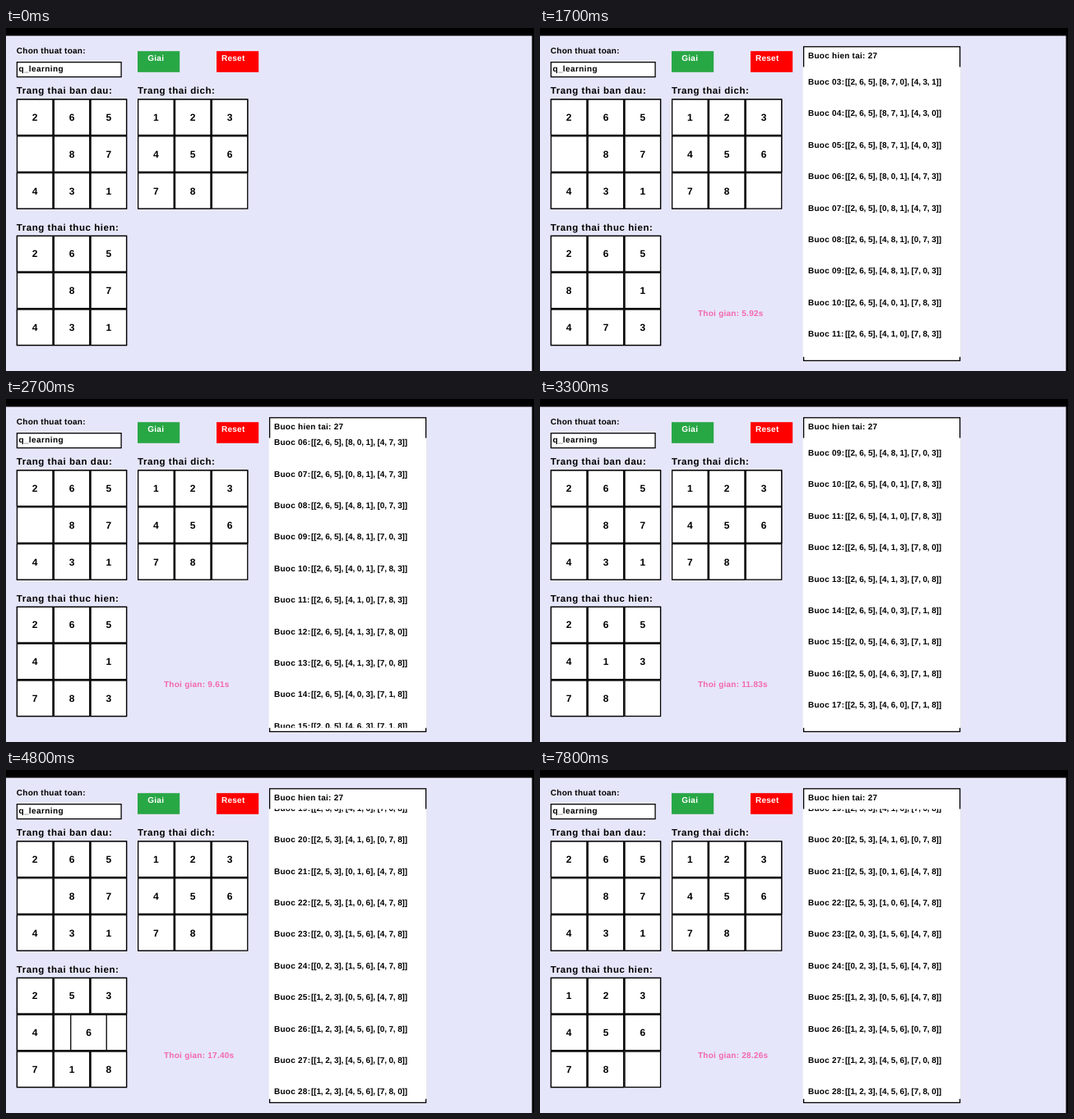
These frames come from a looping animation (642 px wide and 418 px high, 7900 ms). An HTML page:

```html
<!DOCTYPE html>
<html lang="vi">
<head>
<meta charset="utf-8">
<title>8-puzzle</title>
<style>
  html, body { margin: 0; width: 100%; height: 100%; overflow: hidden; background: #000; }
  svg { display: block; width: 642px; height: 418px; }
  text {
    font: bold 10px "Liberation Sans", Arial, sans-serif;
    letter-spacing: .25px;
    text-rendering: geometricPrecision;
    white-space: pre;
  }
  .title { font-size: 11.5px; letter-spacing: .55px; }
  .num { font-size: 12px; letter-spacing: 0; text-anchor: middle; }
  .label { letter-spacing: .4px; }
  .state { letter-spacing: -.125px; }
  .light { fill: #fff; }
  .time { fill: #f268b0; }
  .box { fill: #fff; stroke: #000; stroke-width: 1.3px; }
</style>
</head>
<body>
<svg id="stage" viewBox="0 0 642 418">
  <defs>
    <clipPath id="view"><rect x="319" y="47.5" width="193" height="353.3"/></clipPath>
  </defs>
  <rect y="9.5" width="639.5" height="409" fill="#e6e6fa"/>
  <text x="12.8" y="30.5">Chon thuat toan:</text>
  <rect class="box" x="13.4" y="41.7" width="126.7" height="17.9"/>
  <text class="label" x="15.4" y="52.8">q_learning</text>
  <rect x="160" y="28.2" width="51.2" height="25.6" fill="#28a745"/>
  <text class="light" x="172.3" y="40.2">Giai</text>
  <rect x="256" y="28.2" width="51.2" height="25.6" fill="#f00"/>
  <text class="light" x="262" y="40.2">Reset</text>
  <text class="title" x="12.8" y="80.2">Trang thai ban dau:</text>
  <text class="title" x="160" y="80.2">Trang thai dich:</text>
  <text class="title" x="12.8" y="247">Trang thai thuc hien:</text>
  <g id="boards"></g>
  <g id="result">
    <text id="time" class="time" x="192" y="350.8"></text>
    <rect class="box" x="320.6" y="22.8" width="190" height="382.6"/>
    <rect x="319.5" y="47.5" width="192.2" height="353.3" fill="#fff"/>
    <text x="326" y="37">Buoc hien tai: 27</text>
    <g clip-path="url(#view)"><g id="list"></g></g>
  </g>
</svg>
<script>
const LOOP = 7900, TICK = 100;
const CELL = 44.8, ROW = 38.4, NOTCH = 25.6, MAX_NOTCH = 27.75;
const FIRST_MOVE = 1.24, SLIDE = 0.35, END_TIME = 28.26;

// [seconds in the loop, value]
const CLOCK = [[0.1, 0], [1.7, 5.92], [2.7, 9.61], [3.9, 14.06], [4.8, 17.4], [6.4, 23.31], [7.8, 28.49]];
const SCROLL = [[0.1, 0], [1.4, 0], [1.6, 1], [1.7, 3], [2.7, 8], [3.9, 17], [4.8, 28]];

// Position of the blank at each step
const PATH = [..."3458743674587412547634103678"].map(Number);
const GOAL = [1, 2, 3, 4, 5, 6, 7, 8, 0];

const $ = id => document.getElementById(id);

function add(parent, tag, attrs, text = "") {
  const el = document.createElementNS("http://www.w3.org/2000/svg", tag);
  for (const key in attrs) el.setAttribute(key, attrs[key]);
  el.textContent = text;
  return parent.appendChild(el);
}

const cellPos = i => [i % 3 * CELL, Math.floor(i / 3) * CELL];
const moveTo = (el, x, y) => el.setAttribute("transform", `translate(${x} ${y})`);

function addTile(parent, value) {
  const tile = add(parent, "g", {});
  add(tile, "rect", { class: "box", x: 0.65, y: 0.65, width: CELL - 1.3, height: CELL - 1.3 });
  if (value) add(tile, "text", { class: "num", x: CELL / 2, y: CELL / 2 + 4.3 }, value);
  return tile;
}

// Draws a board and returns its tiles, indexed by number
function addBoard(x, y, state) {
  const board = add($("boards"), "g", {});
  moveTo(board, x, y);
  const tiles = [];
  for (let i = 0; i < 9; i++) moveTo(addTile(board, 0), ...cellPos(i));
  state.forEach((value, i) => {
    if (!value) return;
    tiles[value] = addTile(board, value);
    moveTo(tiles[value], ...cellPos(i));
  });
  return tiles;
}

const states = [[2, 6, 5, 0, 8, 7, 4, 3, 1]];
for (let k = 1; k < PATH.length; k++) {
  const next = [...states[k - 1]];
  next[PATH[k - 1]] = next[PATH[k]];
  next[PATH[k]] = 0;
  states.push(next);
}

addBoard(12.8, 86.4, states[0]);
addBoard(160, 86.4, GOAL);
const tiles = addBoard(12.8, 252.8, states[0]);

states.forEach((s, k) => {
  const y = 69.1 + k * ROW;
  const rows = [0, 3, 6].map(i => `[${s.slice(i, i + 3).join(", ")}]`);
  add($("list"), "text", { x: 326, y }, `Buoc ${String(k + 1).padStart(2, "0")}:`);
  add($("list"), "text", { class: "state", x: 371, y }, `[${rows.join(", ")}]`);
});

function sample(keys, t) {
  if (t <= keys[0][0]) return keys[0][1];
  for (let i = 1; i < keys.length; i++) {
    const [t0, v0] = keys[i - 1], [t1, v1] = keys[i];
    if (t <= t1) return v0 + (v1 - v0) * (t - t0) / (t1 - t0);
  }
  return keys[keys.length - 1][1];
}

function placeTiles(time) {
  const run = Math.max(0, time - FIRST_MOVE);
  const step = Math.min(Math.floor(run), PATH.length - 1);
  const state = states[step];
  state.forEach((value, i) => value && moveTo(tiles[value], ...cellPos(i)));
  if (step === PATH.length - 1) return;
  const p = Math.min(1, (run - step) / SLIDE);
  const [x0, y0] = cellPos(PATH[step + 1]), [x1, y1] = cellPos(PATH[step]);
  moveTo(tiles[state[PATH[step + 1]]], x0 + (x1 - x0) * p, y0 + (y1 - y0) * p);
}

function draw(now) {
  const t = Math.floor(now % LOOP / TICK) * TICK / 1000;
  const time = Math.min(sample(CLOCK, t), END_TIME);
  const notch = Math.min(Math.floor(sample(SCROLL, t) + 0.001), MAX_NOTCH);
  $("result").style.display = t < 0.1 ? "none" : "";
  $("time").textContent = `Thoi gian: ${time.toFixed(2)}s`;
  moveTo($("list"), 0, -notch * NOTCH);
  placeTiles(time);
}

const start = performance.now();
function loop() {
  draw(performance.now() - start);
  requestAnimationFrame(loop);
}
loop();
</script>
</body>
</html>
```
